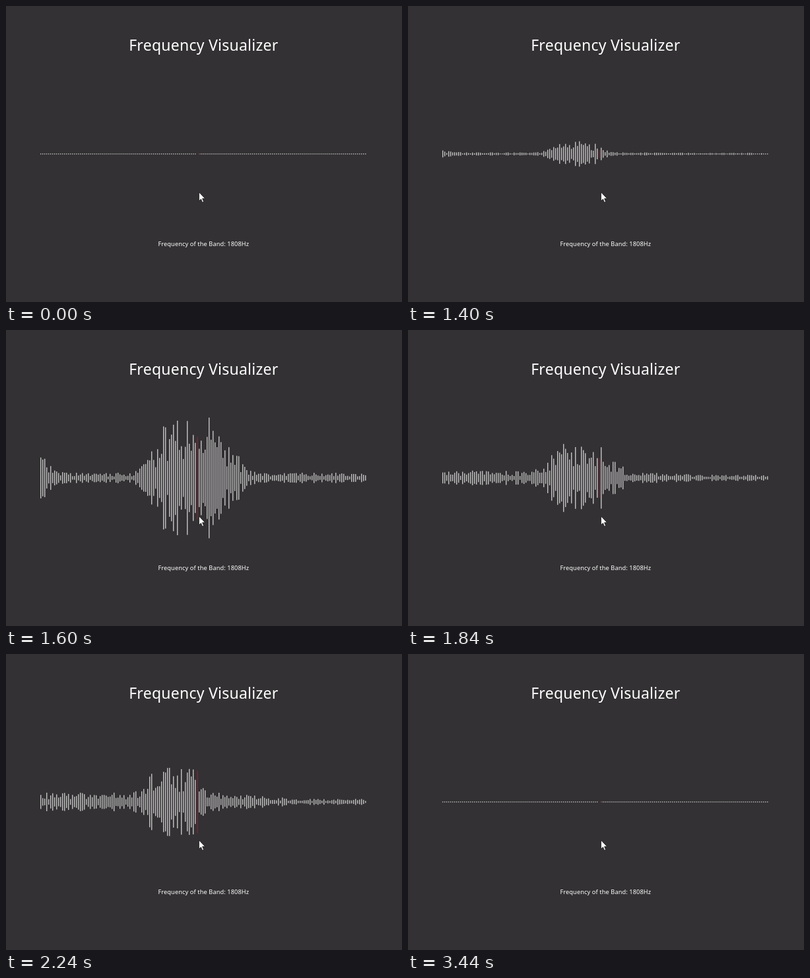
An HTML page with a canvas for the animation above (3.52 s loop, 600 by 450 pixels).

```html
<!DOCTYPE html>
<html lang="en">
<head>
<meta charset="utf-8">
<title>Frequency Visualizer</title>
<style>
  html, body { margin: 0; width: 100%; height: 100%; overflow: hidden; background: #333133; }
  canvas, svg { position: absolute; left: 0; top: 0; width: 600px; height: 450px; }
  text { fill: #fff; font-family: "Noto Sans", "Open Sans", sans-serif; }
</style>
</head>
<body>
<canvas width="600" height="450"></canvas>
<svg viewBox="0 0 600 450">
  <text x="186.2" y="68" font-size="23" letter-spacing=".25">Frequency Visualizer</text>
  <text x="230.4" y="364.6" font-size="9.2" letter-spacing=".12">Frequency of the Band: 1808Hz</text>
  <path d="M292.4 283v13.4l3-2.8 2.1 4.9 2.1-.9-2-4.8h4.1z"
        fill="#fff" stroke="#151515" stroke-width=".8"/>
</svg>
<script>
const LOOP = 3520, STEP = 40, SOUND_START = 1400, SOUND_END = 2440;
const BARS = 165, LEFT = 52.3, GAP = 3, MID = 224.9, REST = 0.7, HOVERED = 79;

// The spectrum is a broad hump on low tails, plus some bass at the left edge.
const KEYS = [
  { time: SOUND_START, centre: 68, width: 14, hump: 11, left: 1.5, right: 1, bass: 3 },
  { time: 1600, centre: 77, width: 22, hump: 55, left: 5, right: 5, bass: 22 },
  { time: 1840, centre: 70, width: 18, hump: 27, left: 7, right: 3, bass: 0 },
  { time: 2240, centre: 68, width: 15, hump: 28, left: 9, right: 3, bass: 0 },
  { time: SOUND_END, centre: 68, width: 14, hump: 0, left: 0, right: 0, bass: 0 }
];

const mix = (a, b, k) => a + (b - a) * k;
const clamp = v => Math.min(1, Math.max(0, v));
const noise = (a, b) => {
  const v = Math.sin(a * 12.9898 + b * 78.233) * 43758.5453;
  return v - Math.floor(v);
};

function spectrumAt(time) {
  const next = KEYS.findIndex(key => key.time > time);
  const from = KEYS[next - 1], to = KEYS[next];
  const k = (time - from.time) / (to.time - from.time);
  return Object.fromEntries(Object.keys(from).map(name => [name, mix(from[name], to[name], k)]));
}

function halfHeight(s, bar) {
  const hump = s.hump * Math.exp(-(((bar - s.centre) / s.width) ** 4));
  const tail = mix(s.left, s.right, clamp((bar - 90) / 40));
  const bass = s.bass * Math.exp(-bar / 4);
  const flicker = 0.4 + 1.2 * noise(bar, s.time / STEP);
  return Math.max(REST, (hump + tail + bass) * flicker);
}

const ctx = document.querySelector("canvas").getContext("2d");

function draw(time) {
  const playing = time >= SOUND_START && time < SOUND_END;
  const spectrum = playing && spectrumAt(time);
  const redBar = playing ? HOVERED : HOVERED + 1;
  ctx.clearRect(0, 0, 600, 450);
  for (let bar = 0; bar < BARS; bar++) {
    if (!playing && bar === HOVERED) continue;
    const half = playing ? halfHeight(spectrum, bar) : REST;
    ctx.fillStyle = bar !== redBar ? "#fff" : playing ? "#a01430" : "#f0445c";
    ctx.fillRect(LEFT + bar * GAP, MID - half, bar === redBar ? 1.4 : 1, half * 2);
  }
}

const origin = performance.now();
function frame() {
  let time = Math.floor((performance.now() - origin) % LOOP / STEP) * STEP;
  if (time === 1960) time = 1920; // the sound holds for one step
  draw(time);
  requestAnimationFrame(frame);
}
frame();
</script>
</body>
</html>
```
